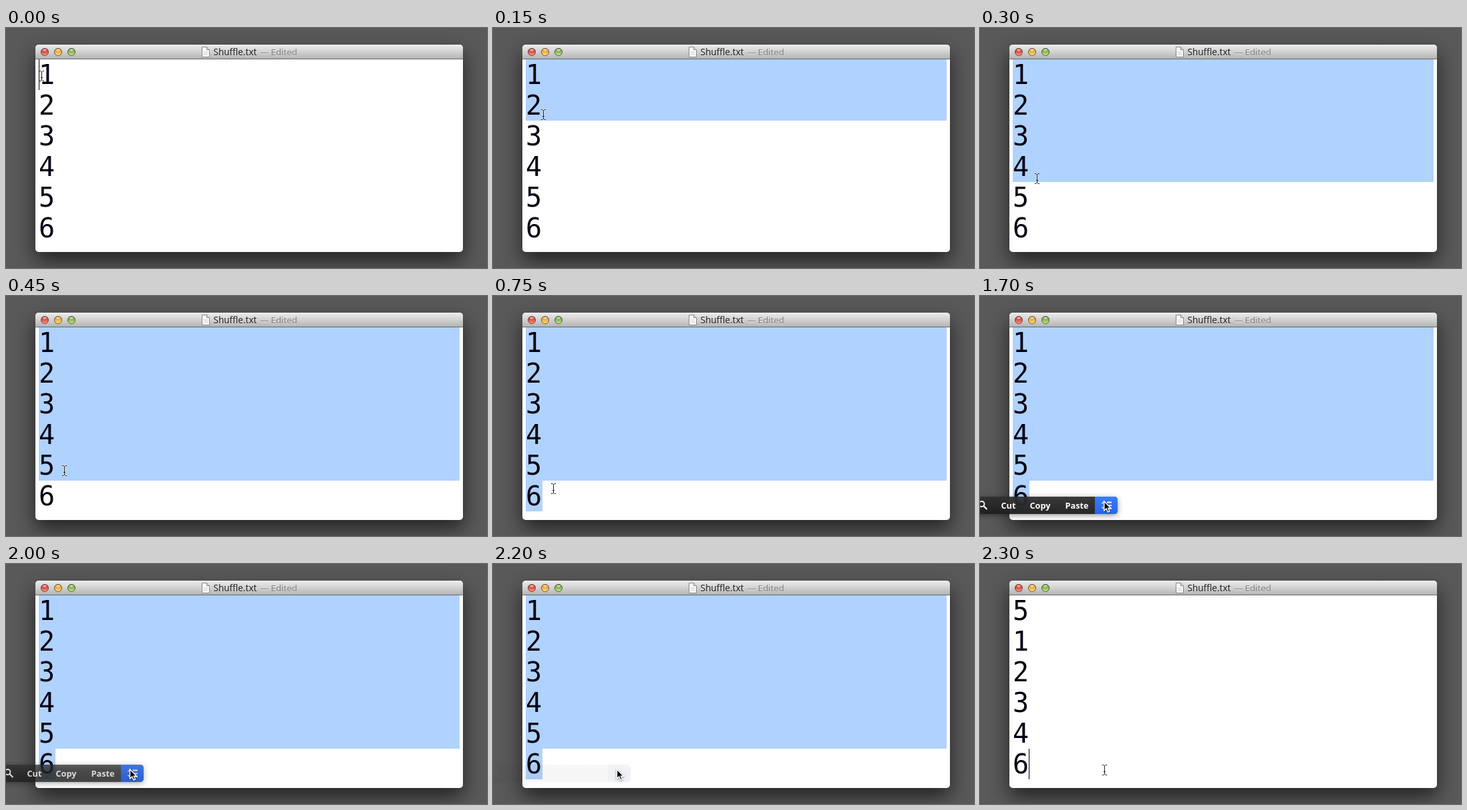
An HTML page with a canvas for the animation above (3800 ms loop, 720x360 px).

```html
<!DOCTYPE html>
<html lang="en">
<head>
<meta charset="utf-8">
<title>Shuffle lines</title>
<style>
html, body { margin: 0; width: 100%; height: 100%; overflow: hidden; background: #595959; }
canvas { display: block; }
</style>
</head>
<body>
<canvas id="stage" width="720" height="360"></canvas>
<script>
const ctx = document.getElementById('stage').getContext('2d');
const LOOP = 3800, STEP = 50;
const LINE = 46, TOP = 47, LEFT = 49;
const UI_FONT = '"Noto Sans", "Open Sans", sans-serif';

// Pointer hot spot: time, x, y
const POINTER = [
  [0, 54, 72], [50, 56, 75], [150, 76, 130], [300, 85.5, 226], [400, 87, 256],
  [550, 89, 273], [750, 90.5, 289], [1250, 90.5, 289], [1450, 150, 304],
  [1650, 186, 308], [1800, 185.5, 308], [2250, 185.5, 308], [2300, 186.5, 309]
];

const clamp = v => Math.max(0, Math.min(1, v));
const ramp = (t, from, to) => clamp((t - from) / (to - from));

function pointerAt(t) {
  const next = POINTER.findIndex(p => p[0] > t);
  if (next < 0) return POINTER[POINTER.length - 1].slice(1);
  const a = POINTER[next - 1], b = POINTER[next], k = ramp(t, a[0], b[0]);
  return [a[1] + (b[1] - a[1]) * k, a[2] + (b[2] - a[2]) * k];
}

function rect(x, y, w, h, color) {
  ctx.fillStyle = color;
  ctx.fillRect(x, y, w, h);
}

function rounded(x, y, w, h, radii, fill) {
  ctx.beginPath();
  ctx.roundRect(x, y, w, h, radii);
  ctx.fillStyle = fill;
  ctx.fill();
}

function shade(y0, y1, ...colors) {
  const g = ctx.createLinearGradient(0, y0, 0, y1);
  colors.forEach((c, i) => g.addColorStop(i / (colors.length - 1), c));
  return g;
}

function text(str, x, y, font, color) {
  ctx.font = font;
  ctx.fillStyle = color;
  ctx.fillText(str, x, y);
}

function path(d, stroke, width, fill) {
  const p = new Path2D(d);
  if (fill) { ctx.fillStyle = fill; ctx.fill(p); }
  if (stroke) { ctx.strokeStyle = stroke; ctx.lineWidth = width; ctx.stroke(p); }
}

function withShadow(color, blur, offset, draw) {
  ctx.save();
  ctx.shadowColor = color;
  ctx.shadowBlur = blur;
  ctx.shadowOffsetY = offset;
  draw();
  ctx.restore();
}

function drawLight(x, dark, mid, light) {
  ctx.beginPath();
  ctx.arc(x, 36, 5.6, 0, 7);
  ctx.fillStyle = shade(30, 42, dark, mid, light);
  ctx.fill();
  ctx.strokeStyle = 'rgba(60,40,30,.65)';
  ctx.lineWidth = 1;
  ctx.stroke();
  ctx.beginPath();
  ctx.ellipse(x, 33, 2.8, 1.6, 0, 0, 7);
  ctx.fillStyle = 'rgba(255,255,255,.6)';
  ctx.fill();
}

function drawWindow() {
  rect(0, 0, 720, 360, '#595959');
  withShadow('rgba(0,0,0,.62)', 30, 13, () => rounded(44, 25, 640, 311, 5, '#fff'));
  rounded(44, 25, 640, 22, [5, 5, 0, 0], shade(25, 46, '#ececec', '#d2d2d2', '#b4b4b4'));
  rect(48, 25, 632, 1, '#f4f4f4');
  rect(44, 46, 640, 1, '#686868');

  drawLight(58, '#b8352c', '#e2554a', '#ff9c8c');
  drawLight(78, '#c8862a', '#efb143', '#ffe48c');
  drawLight(98, '#5c8f39', '#8dbb57', '#c9ee98');

  path('M293.5 28.5H300.5L304.5 32.5V43.5H293.5Z', '#888', 1, '#fafafa');
  path('M300.5 28.5V32.5H304.5', '#888', 1, '#ddd');
  path('M295.5 35.5H302M295.5 37.5H302M295.5 39.5H302', '#ccc', .7);
  withShadow('rgba(255,255,255,.6)', 0, 1, () => {
    text('Shuffle.txt', 310.5, 41, `13.5px ${UI_FONT}`, '#222');
    text('—', 380.5, 41, `13px ${UI_FONT}`, '#868686');
    text('Edited', 396.5, 41, `13.3px ${UI_FONT}`, '#808080');
  });
}

function drawSelection(x, y) {
  const rows = Math.min(6, Math.floor((y - TOP) / LINE) + 1);
  const last = rows - 1;
  const color = '#b0d2ff';
  rect(LEFT, TOP, 630, last * LINE, color);
  if (x > 62) rect(LEFT, TOP + last * LINE, rows < 6 && x > 74 ? 630 : 25, LINE, color);
}

function drawDigits(digits) {
  [...digits].forEach((d, i) =>
    text(d, LEFT, 84 + i * LINE, '40px "DejaVu Sans Mono", monospace', '#000010'));
}

function drawMenu(alpha, active) {
  if (alpha <= 0) return;
  ctx.save();
  ctx.globalAlpha = alpha;
  withShadow('rgba(0,0,0,.45)', 8, 2, () =>
    rounded(-20, 301, 226, 26, 5, shade(301, 327, 'rgba(48,48,48,.93)', 'rgba(30,30,30,.93)')));
  if (active) rounded(172, 301, 34, 26, [0, 5, 5, 0], shade(301, 327, '#3a7cff', '#2566ee'));
  [['Cut', 31.5], ['Copy', 74.5], ['Paste', 127.5]].forEach(([label, x]) =>
    text(label, x, 319, `bold 12.7px ${UI_FONT}`, '#fff'));
  ctx.beginPath();
  ctx.arc(2.5, 312, 4, 0, 7);
  ctx.strokeStyle = '#fff';
  ctx.lineWidth = 1.8;
  ctx.stroke();
  path('M5.5 315L10.5 320', '#fff', 2.2);
  path('M185.5 309V319M182.5 311.5L185.5 308.5L188.5 311.5M182.5 316.5L185.5 319.5L188.5 316.5', '#fff', 1.5);
  path('M190 309.5H197M190 314.3H197M190 319H197', '#fff', 1.8);
  ctx.restore();
}

function drawBeam(x, y) {
  ctx.save();
  ctx.translate(Math.round(x) - .5, Math.round(y));
  const d = 'M-3.5 -7.5H-1.5L0 -6L1.5 -7.5H3.5M0 -6V6M-3.5 7.5H-1.5L0 6L1.5 7.5H3.5M-1.5 2.5H1.5';
  path(d, 'rgba(255,255,255,.45)', 2.4);
  path(d, '#222', 1);
  ctx.restore();
}

function drawArrow(x, y) {
  ctx.save();
  ctx.translate(x, y);
  withShadow('rgba(0,0,0,.35)', 3, 1, () =>
    path('M0 0V14L3.2 11L5.6 16L8 15L5.8 10.2H10Z', '#fff', 1.4, '#000'));
  ctx.restore();
}

function render(t) {
  const [x, y] = pointerAt(t);
  const shuffled = t >= 2250;
  const menuAlpha = t < 1900 ? ramp(t, 900, 1150) : 1 - ramp(t, 1950, 2208);
  const overMenu = t > 1250 && t < 2300 && y > 301;

  drawWindow();
  if (t >= 50 && !shuffled) drawSelection(x, t > 550 ? Math.max(y, 278) : y);
  drawDigits(shuffled ? '512346' : '123456');
  if (t < 50) rect(LEFT, TOP, 1, LINE, '#000');
  if (shuffled) rect(73, 277, 1, LINE, '#000');
  drawMenu(menuAlpha, overMenu && x > 172);
  (overMenu ? drawArrow : drawBeam)(x, y);
}

const start = performance.now();
function tick() {
  const elapsed = (performance.now() - start) % LOOP;
  render(Math.floor(elapsed / STEP) * STEP);
  requestAnimationFrame(tick);
}
tick();
</script>
</body>
</html>
```
